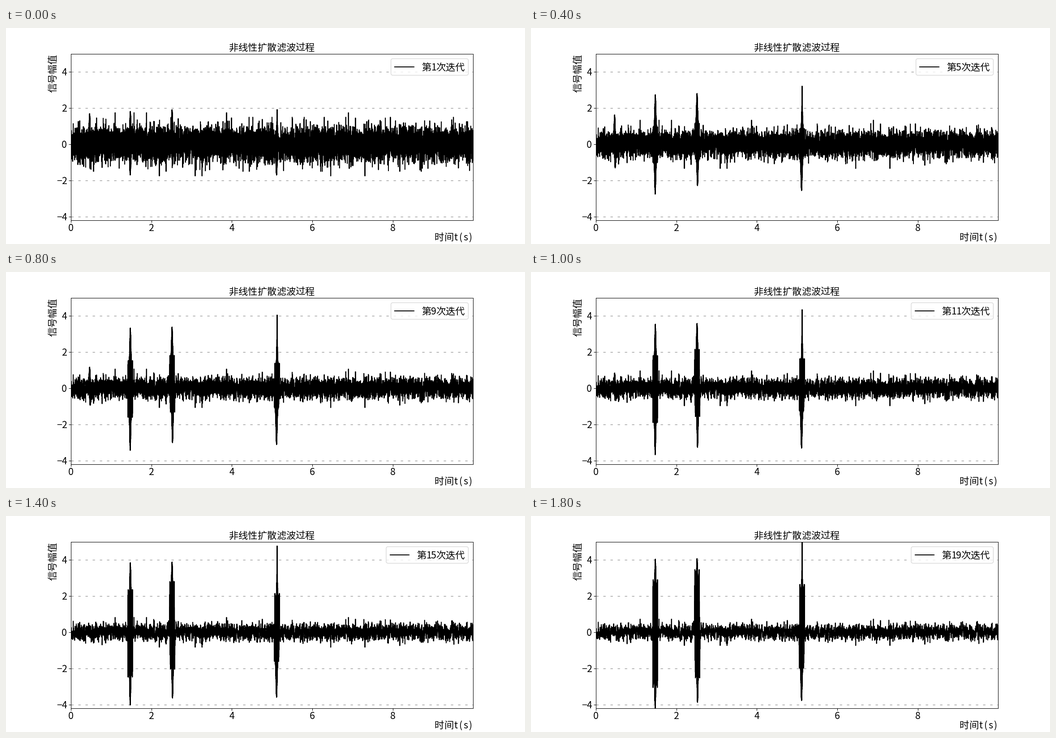
Recreate the animation shown at these times as a matplotlib script. Size 1159 px wide and 483 px high, loop 1.9 s.

```python
import numpy as np
import matplotlib.pyplot as plt
from matplotlib.animation import FuncAnimation
from matplotlib.patches import FancyBboxPatch

W, H, DPI = 1159, 483, 96
STEPS, N = 19, 10000
EM = 16 * DPI / 72
LEFT, RIGHT, TOP, BOTTOM = 0.125 * W, 0.9 * W, 0.12 * H, 0.89 * H
T_MAX, Y_MIN, Y_MAX = 9.999, -4.2, 5

plt.rcParams["font.family"] = ["Noto Sans CJK JP", "DejaVu Sans"]
plt.rcParams["font.size"] = 16

fig = plt.figure(figsize=(W / DPI, H / DPI), dpi=DPI, facecolor="white")
ax = fig.add_axes([0.125, 0.11, 0.775, 0.77])
ax.set(xlim=(0, T_MAX), ylim=(Y_MIN, Y_MAX),
       xticks=range(0, 9, 2), yticks=range(-4, 5, 2))
ax.tick_params(labelbottom=False, labelleft=False)
ax.grid(axis="y", color="gray", lw=0.8, ls=(0, (5, 10)))

# Overlay in pixel coordinates for text and legend
stage = fig.add_axes([0, 0, 1, 1], zorder=5)
stage.set(xlim=(0, W), ylim=(H, 0))
stage.axis("off")


def cell(ch):
    """Advance of a character: full width for Chinese, half for the rest."""
    return EM if ord(ch) > 0x3000 else EM / 2


def row(s, right, base):
    """Write s on a half/full width grid that ends at right."""
    out = []
    for ch in reversed(s):
        w = cell(ch)
        out.append(stage.text(right - w / 2, base, ch,
                              ha="center", va="baseline"))
        right -= w
    return out


row("非线性扩散滤波过程", (LEFT + RIGHT) / 2 + 4.5 * EM - 1, 51)
row("时间t(s)", RIGHT - 1, 475)
stage.text(112, TOP + 1, "信号幅值", rotation=90, rotation_mode="anchor",
           ha="right", va="baseline")
for v in range(-4, 5, 2):
    y_px = TOP + (Y_MAX - v) / (Y_MAX - Y_MIN) * (BOTTOM - TOP)
    row(str(v).replace("-", "\u2212"), LEFT - 9.3, y_px + 7.8)
for v in range(0, 9, 2):
    row(str(v), LEFT + v / T_MAX * (RIGHT - LEFT) + EM / 4, 454)

# Noise: a rough part that fades and a smooth part that stays
t = np.arange(N) / 1000
rng = np.random.default_rng(5)
rough = np.clip(rng.normal(0, 0.47, N), -1.5, 1.5)
kernel = np.exp(-0.5 * (np.arange(-9, 10) / 1.9) ** 2)
smooth = np.convolve(rough, kernel / kernel.sum(), "same")

# The tallest lone peaks, all fading alike
for sign, times in ((1, (1.1, 1.57, 1.88, 3.87, 6.9)),
                    (-1, (2.2, 3.09, 3.26, 6.46, 7.31))):
    at = np.rint(np.multiply(times, 1000)).astype(int)
    rough[at], smooth[at] = sign * 1.75, sign * 0.55

# One side of a burst: time, final height, edge level, core width, first level
BURSTS = [
    (1.478, 4.05, 0.72, 0.018, 0.45), (1.475, -4.25, 0.72, 0.016, 0.40),
    (2.515, 4.08, 0.85, 0.018, 0.47), (2.527, -3.88, 0.65, 0.018, 0.30),
    (5.127, 5.10, 0.52, 0.007, 0.38), (5.113, -3.78, 0.50, 0.030, 0.45),
]


def reach(y, edge, sign):
    """Stretch every other sample out to the edge of a burst."""
    side = slice(0, None, 2) if sign > 0 else slice(1, None, 2)
    y[side] = np.where(edge[side] > 0.05,
                       sign * np.maximum(sign * y[side], edge[side]), y[side])


def signal(k):
    y = smooth + (rough - smooth) * np.exp(-(k - 1) / 9.5)
    grow = (1 - np.exp(-(k - 1) / 9)) / (1 - np.exp(-2))
    for when, height, level, width, first in BURSTS:
        d = t - when
        shape = level + (1 - level) * np.exp(-(d / width) ** 2)
        shape *= 0.88 + 0.12 * np.cos(2 * np.pi * d / 0.055)
        shape *= np.clip((0.063 - np.abs(d)) / 0.008, 0, 1)
        # The core rises first, the flanks follow steadily
        core = np.exp(-(d / 0.033) ** 2)
        gain = core * (first + (1 - first) * grow) + (1 - core) * (k + 1) / 20
        reach(y, abs(height) * shape * gain, np.sign(height))
    fade = 1.7 / (1 + (k / 11) ** 4)
    for sign, when, size in ((1, 0.466, 1), (-1, 0.48, 0.8)):
        reach(y, size * fade * np.exp(-((t - when) / 0.02) ** 2), sign)
    return y


line, = ax.plot(t, signal(1), color="black", lw=1.5)
legend = []


def draw_legend(k):
    while legend:
        legend.pop().remove()
    label = f"第{k}次迭代"
    right, top = RIGHT - EM / 2, TOP + EM / 2
    text_right = right - 0.4 * EM
    left = text_right - sum(map(cell, label)) - 3.2 * EM
    box = FancyBboxPatch((left, top), right - left, 37,
                         boxstyle=f"round,pad=0,rounding_size={0.2 * EM}",
                         fc="white", ec="0.8", lw=1, alpha=0.8)
    legend.append(stage.add_patch(box))
    legend.extend(stage.plot([left + 0.4 * EM, left + 2.4 * EM], [87, 87],
                             color="black", lw=1.5))
    legend.extend(row(label, text_right, 95))


def update(i):
    line.set_ydata(signal(i + 1))
    draw_legend(i + 1)
    return [line, *legend]


anim = FuncAnimation(fig, update, frames=STEPS, interval=100,
                     repeat=True, repeat_delay=0, blit=False)
plt.show()
```
